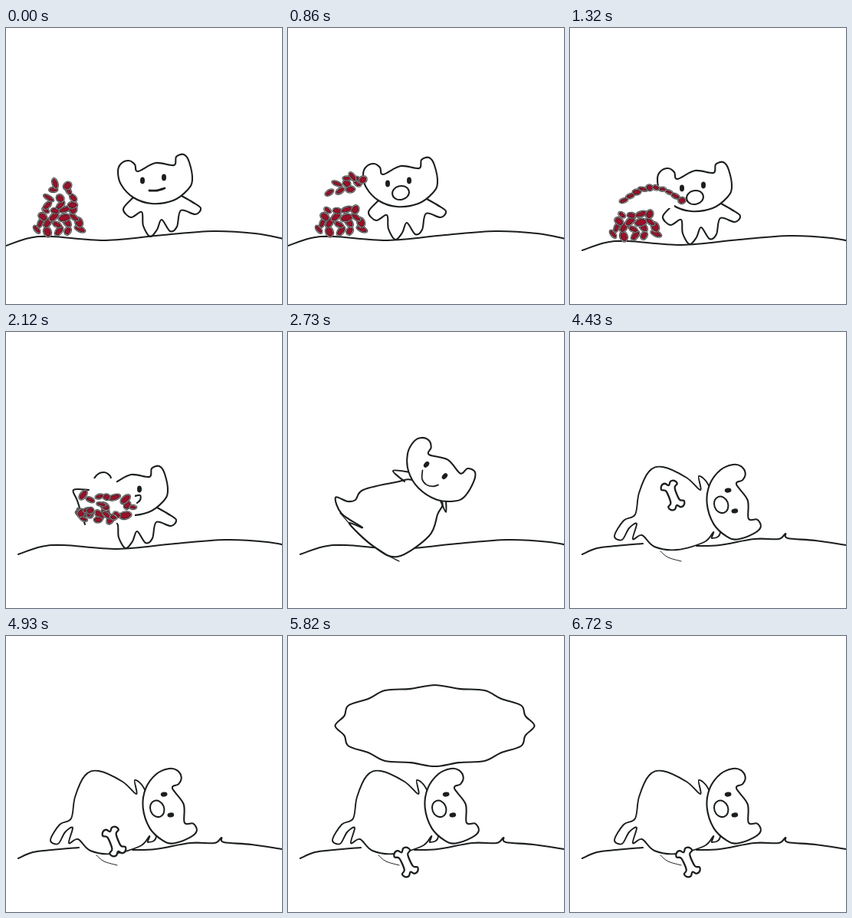
An HTML page with a canvas for the animation above (6950 ms loop, 360 by 360 pixels).

```html
<!DOCTYPE html>
<html lang="en">
<head>
<meta charset="utf-8">
<title>Bear and beans</title>
<style>
html, body { margin: 0; width: 100%; height: 100%; overflow: hidden; background: #fff; }
canvas { display: block; width: 360px; height: 360px; }
</style>
</head>
<body>
<canvas id="stage" width="360" height="360"></canvas>
<script>
const ctx = document.getElementById('stage').getContext('2d');
const LOOP = 6950;
const INK = '#1b1e1f';
const RED = '#9a1029';
const mix = (a, b, k) => a + (b - a) * k;

// Smooth line through flat x,y points.
function line(p, { w = 2.1, closed = false, color = INK } = {}) {
  const n = p.length / 2;
  const at = i => {
    const k = closed ? (i + n) % n : Math.max(0, Math.min(n - 1, i));
    return [p[2 * k], p[2 * k + 1]];
  };
  ctx.beginPath();
  ctx.moveTo(p[0], p[1]);
  for (let i = 0; i < (closed ? n : n - 1); i++) {
    const [a, b, c, d] = [at(i - 1), at(i), at(i + 1), at(i + 2)];
    ctx.bezierCurveTo(b[0] + (c[0] - a[0]) / 6, b[1] + (c[1] - a[1]) / 6,
      c[0] - (d[0] - b[0]) / 6, c[1] - (d[1] - b[1]) / 6, c[0], c[1]);
  }
  if (closed) { ctx.fillStyle = '#fff'; ctx.fill(); }
  ctx.lineWidth = w;
  ctx.strokeStyle = color;
  ctx.stroke();
}

const shape = (p, w) => line(p, { w, closed: true });

function oval(x, y, rx, ry, { turn = 0, fill = INK, stroke = INK, w = 0 } = {}) {
  ctx.beginPath();
  ctx.ellipse(x, y, rx, ry, turn, 0, Math.PI * 2);
  ctx.fillStyle = fill;
  ctx.fill();
  if (w) { ctx.lineWidth = w; ctx.strokeStyle = stroke; ctx.stroke(); }
}

function placed(x, y, turn, draw) {
  ctx.save();
  ctx.translate(x, y);
  ctx.rotate(turn);
  draw();
  ctx.restore();
}

// Ground
const HILL = [0,284, 30,274, 60,272, 130,277, 205,270, 270,265, 325,268, 362,275];
const nearHill = () => line(HILL);
const farHill = () => placed(16, 6, 0, nearHill);

// Bear, measured from the point between the eyes
const HEAD = [-20,-10, -24,-19, -32,-24, -42,-20, -46,-10, -42,7, -26,24, -2,32, 26,28, 45,14, 51,1,
  47,-22, 40,-32, 30,-29, 27,-18, 3,-21];
const LIMBS = [-26,24, -39,39, -29,50, -15,43, -13,61, -4,75, 5,66, 11,53, 22,68, 31,62, 36,41,
  55,46, 62,38, 51,30, 37,22];
const MOUTHS = {
  flat: () => line([-5,15, 5,15, 15,12], { w: 2.8 }),
  smile: () => line([-13,11, -6,20, 3,22, 11,18, 15,12], { w: 1.7 }),
  half: () => oval(4, 14, 9, 5, { turn: -.3, fill: '#fff', w: 2 }),
  open: () => oval(3, 14, 11, 9, { turn: -.2, fill: '#fff', w: 2 }),
  gulp: () => line([8,7, 15,6, 15,12, 11,16])
};

function head(x, y, turn, mouth) {
  placed(x, y, turn, () => {
    shape(HEAD);
    oval(-14, 2, 3, 4.4);
    oval(14, -2, 3, 4.4);
    MOUTHS[mouth]();
  });
}

function standing(x, y, mouth) {
  placed(x, y, 0, () => line(LIMBS));
  head(x, y, 0, mouth);
}

// Beans: a heap whose upper half flies off in an arc
function seeded(seed) {
  return () => (seed = seed * 16807 % 2147483647) / 2147483647;
}

function makeHeap() {
  const rnd = seeded(77);
  const heap = [];
  const rows = 8;
  for (let r = 0; r < rows; r++) {
    const h = r / (rows - 1);
    const n = Math.round(mix(5, 2, h));
    for (let c = 0; c < n; c++) {
      const u = rnd() ** 1.4;
      heap.push({
        x: mix(mix(35, 54, h), mix(101, 90, h), (c + .5) / n) + mix(-2, 2, rnd()),
        y: 264 - 60 * h + mix(-2, 2, rnd()),
        rx: mix(5.5, 9, rnd()), ry: mix(3.4, 5.4, rnd()), turn: mix(-1.3, 1.3, rnd()),
        loose: h > .5,
        whirlX: mix(81, 154, u),
        whirlY: 223 + mix(-1, 1, rnd()) * mix(24, 8, u)
      });
    }
  }
  const loose = heap.filter(b => b.loose);
  loose.forEach((b, i) => {
    const u = i / (loose.length - 1);
    b.arcX = mix(54, 130, u);
    b.arcY = 219 - 17 * Math.sin(Math.PI * u);
  });
  return heap;
}

const HEAP = makeHeap();

// fly: loose beans take the arc; whirl: all are sucked up; gone: all reach the mouth
function beans(fly, whirl = 0, gone = 0) {
  for (const b of HEAP) {
    const f = b.loose ? fly : 0;
    let x = f ? mix(b.x, b.arcX, f) : b.x;
    let y = f ? mix(b.y, b.arcY, f) - 14 * Math.sin(Math.PI * f) : b.y;
    x = mix(mix(x, b.whirlX, whirl), 152, gone);
    y = mix(mix(y, b.whirlY, whirl), 224, gone);
    const size = 1 - .15 * f - .4 * gone;
    const turn = mix(b.turn, b.turn / 3, f);
    oval(x, y, b.rx * size, b.ry * size, { turn, fill: '#fff', stroke: '#555', w: 1.2 });
    oval(x, y, b.rx * size - 1.3, b.ry * size - 1.3, { turn, fill: RED, stroke: '#2a1015', w: .9 });
  }
}

function meet() {
  nearHill();
  standing(192, 197, 'flat');
  beans(0);
}

function approach(mouth, fly) {
  nearHill();
  standing(144, 201, mouth);
  beans(fly);
}

function erase(x, y, w, h) {
  ctx.fillStyle = '#fff';
  ctx.fillRect(x, y, w, h);
}

function feast(whirl, gone = 0) {
  farHill();
  standing(160, 207, whirl < 1 ? 'open' : 'gulp');
  if (whirl < 1) {
    erase(112, 206, 24, 29);
  } else {
    erase(100, 191, 44, 84);
    erase(138, 197, 30, 50);
    line([108,206, 88,206, 93,220, 103,251]);
  }
  placed(16, 6, 0, () => beans(1, whirl, gone));
}

// Stuffed bear
function stuffed() {
  farHill();
  oval(152, 230, 57, 51, { fill: '#fff', w: 2.1 });
  head(162, 152, 0, 'smile');
}

function toppling() {
  farHill();
  shape([165,194, 140,196, 98,206, 88,219, 78,221, 62,216, 70,237, 97,255, 80,250, 112,280, 143,293,
    184,266, 195,238, 200,220]);
  line([68,236, 97,268, 128,290, 145,299], { w: 1.3 });
  line([160,183, 137,181, 152,195]);
  line([199,220, 206,235, 206,219]);
  head(192.5, 180.5, .71, 'smile');
}

const BODY = [182,203, 168,188, 170,206, 152,190, 121,176, 103,182, 90,210, 85,238, 70,246, 58,266, 68,271,
  77,256, 87,250, 82,270, 94,265, 110,280, 140,284, 175,274, 187,261, 185,269, 196,259];

function lying(mouth, swell = 1) {
  line([16,290, 35,282, 60,279, 95,276]);
  line([165,279, 195,278, 240,270, 272,270, 281,263, 284,269, 320,272, 360,278]);
  line([118,286, 128,294, 145,299], { w: 1 });
  ctx.save();
  ctx.translate(0, 283 * (1 - swell));
  ctx.scale(1, swell);
  shape(BODY, 1.9);
  ctx.restore();
  head(210.5, 220, 1.4, mouth);
}

// Bone: one corner mirrored to four
function boneOutline() {
  const corner = [[6, -8], [11, -12], [9, -17], [4, -18]];
  const right = [[0, -14], ...corner.slice().reverse(), ...corner.map(([x, y]) => [x, -y])];
  return [...right, ...right.map(([x, y]) => [-x, -y])].flat();
}

const BONE = boneOutline();

function withBone(x, y, turn = -.38) {
  lying('open');
  placed(x, y, turn, () => shape(BONE, 2.3));
}

function puff(x, y, rx, ry) {
  const pts = [];
  for (let i = 0; i < 24; i++) {
    const a = i * Math.PI / 12;
    const r = 1 - .06 * (i % 2);
    pts.push(x + rx * r * Math.cos(a), y + ry * r * Math.sin(a));
  }
  shape(pts);
}

const rest = () => withBone(154, 295, -.42);

const STEPS = [
  [0, meet],
  [230, () => approach('flat', 0)],
  [430, () => approach('half', 0)],
  [660, () => approach('open', 0)],
  [860, () => approach('open', .35)],
  [990, () => approach('open', .65)],
  [1190, () => approach('open', 1)],
  [1320, () => feast(0)],
  [1550, () => feast(.15)],
  [1820, () => feast(.55)],
  [2120, () => feast(1)],
  [2390, () => feast(1, .7)],
  [2560, stuffed],
  [2730, toppling],
  [2960, () => lying('smile', 1.12)],
  [3230, () => lying('smile')],
  [3460, () => lying('open')],
  [3760, () => withBone(184, 199)],
  [3960, () => withBone(174, 188)],
  [4160, () => withBone(160, 182)],
  [4430, () => withBone(134, 213)],
  [4700, () => withBone(131, 245)],
  [4930, () => withBone(141, 268)],
  [5360, rest],
  [5590, () => { rest(); puff(172, 161, 19, 20); }],
  [5820, () => { rest(); puff(191.5, 117, 130, 53); }],
  [6720, rest]
];

ctx.lineCap = ctx.lineJoin = 'round';
const start = performance.now();

function frame(now) {
  const t = Math.max(0, now - start) % LOOP;
  erase(0, 0, 360, 360);
  STEPS.findLast(([from]) => from <= t)[1]();
  requestAnimationFrame(frame);
}
frame(start);
</script>
</body>
</html>
```
